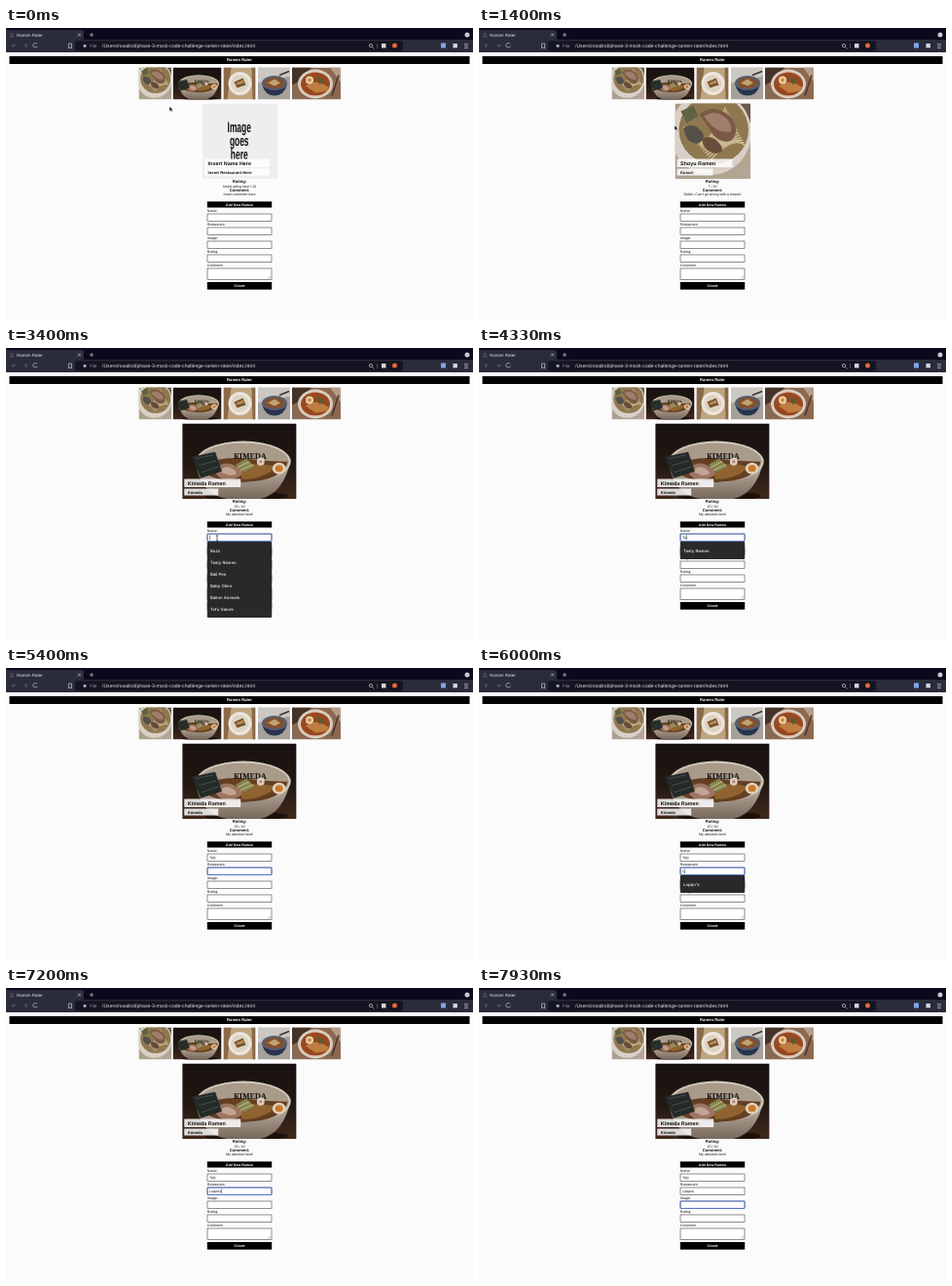
Recreate the animation shown at these times as an HTML page. Size 480 by 300 pixels, loop 8 s.

```html
<!DOCTYPE html>
<html lang="en">
<head>
<meta charset="utf-8">
<title>Ramen Rater</title>
<style>
  html, body { margin: 0; width: 100%; height: 100%; overflow: hidden; background: #fbfbfc; }
  svg#stage { display: block; width: 100vw; height: 100vh; }
  text { font: 3.6px "Liberation Sans", Arial, sans-serif; fill: #111; text-rendering: geometricPrecision; white-space: pre; }
  .bold { font-weight: bold; }
  .h2 { font-size: 5.4px; font-weight: bold; }
  .h3 { font-size: 4.2px; font-weight: bold; }
  .mid { text-anchor: middle; }
  .light { fill: #fff; }
  .poster text { font-size: 15px; font-weight: bold; }
  .menu text { font: 500 4.3px Inter, "Liberation Sans", sans-serif; fill: #f2f2f2; }
  .chrome text { fill: #e6e5ee; }
  .line { fill: none; stroke: #c9c8d6; stroke-width: .7; }
  .dim { stroke: #66657a; }
</style>
</head>
<body>
<svg id="stage" viewBox="0 0 480 300">
  <defs>
    <linearGradient id="linen" x2="1" y2="1"><stop stop-color="#a99780"/><stop offset="1" stop-color="#b3a797"/></linearGradient>
    <linearGradient id="room" x2="0" y2="1"><stop stop-color="#17110f"/><stop offset=".5" stop-color="#211712"/><stop offset="1" stop-color="#40281b"/></linearGradient>
    <linearGradient id="bowl" x2="0" y2="1"><stop stop-color="#c9beb0"/><stop offset="1" stop-color="#77685b"/></linearGradient>

    <symbol id="shoyu" viewBox="0 0 78 77" preserveAspectRatio="none">
      <rect width="78" height="77" fill="url(#linen)"/>
      <path d="M46 0H78V24Z" fill="#6d5a48"/>
      <ellipse cx="37" cy="30" rx="42" ry="43" fill="#d8d0c6"/>
      <ellipse cx="40" cy="27" rx="36" ry="35" fill="#8f784f"/>
      <g id="noodles" fill="none" stroke="#cdbb91" stroke-width="1.4"/>
      <path d="M6 8L19 2L24 13L12 20Z" fill="#5f6342"/>
      <path d="M9 25Q18 19 26 27T24 41Q11 41 9 25Z" fill="#55504a"/>
      <path d="M25 11Q38 1 51 9T63 29Q61 40 52 39T38 30T25 11Z" fill="#7b5948"/>
      <path d="M30 13Q40 6 50 13T58 29Q48 30 41 25T30 13Z" fill="#a07e6b"/>
      <path d="M28 36Q38 31 46 41T40 51Q28 47 28 36Z" fill="#6a4c3a"/>
    </symbol>

    <symbol id="house" viewBox="0 0 118 77" preserveAspectRatio="none">
      <rect width="118" height="77" fill="url(#room)"/>
      <ellipse cx="66" cy="74" rx="43" ry="5" fill="#1d120d"/>
      <path d="M14 39Q18 73 47 77H81Q105 71 112 37Z" fill="url(#bowl)"/>
      <ellipse cx="63" cy="39" rx="49" ry="21" fill="#d0c7ba"/>
      <ellipse cx="63" cy="39" rx="47" ry="19" fill="#a99b89"/>
      <path d="M17 43Q40 33 66 36T109 39Q104 59 63 60Q24 59 17 43Z" fill="#633e20"/>
      <text class="mid bold" x="70" y="36" style="font-size:8px;font-family:'Noto Serif',serif">KIMEDA</text>
      <path d="M58 46Q75 38 97 44Q85 57 62 57Z" fill="#8f6331"/>
      <path d="M33 48Q43 36 56 44T52 57Q38 60 33 48Z" fill="#9a7563"/>
      <path d="M38 49Q45 41 53 47T48 53Z" fill="#c4a391"/>
      <path d="M10 34L34 29L41 49L19 56Z" fill="#242a28"/>
      <path d="M14 36L32 32M17 43L35 38M20 50L38 44" stroke="#434c48" fill="none"/>
      <path d="M55 42L66 36L75 44L63 50Z" fill="#85834f"/>
      <path d="M57 45L69 39M60 48L73 42" stroke="#bab78b" fill="none"/>
      <circle cx="81" cy="39" r="4" fill="#d9cfc3"/><circle cx="81" cy="39" r="1.6" fill="#bd7c75"/>
      <ellipse cx="100" cy="46" rx="7" ry="6" fill="#ded0ba"/><ellipse cx="100" cy="46" rx="4" ry="3.5" fill="#c9792a"/>
    </symbol>

    <symbol id="plate" viewBox="0 0 33 33">
      <rect width="33" height="33" fill="#bda582"/>
      <path d="M0 0H8L4 33H0ZM29 0H33V33H30Z" fill="#8a6848"/>
      <circle cx="17" cy="16.5" r="12" fill="#ece6da"/>
      <circle cx="17" cy="16.5" r="9" fill="#ddd3c2"/>
      <path d="M11 15L20 11L23 18L14 21Z" fill="#76502f"/>
      <path d="M13 16L20 13L21 16L14 18Z" fill="#b58c58"/>
    </symbol>

    <symbol id="blue" viewBox="0 0 33 33">
      <rect width="33" height="33" fill="#a7a19c"/>
      <path d="M0 0H33V9L0 16Z" fill="#cbc8c4"/>
      <path d="M4 17Q7 29 17 29T30 17Z" fill="#29354b"/>
      <ellipse cx="17" cy="16" rx="13" ry="7.5" fill="#4d607d"/>
      <ellipse cx="17" cy="16" rx="11" ry="6" fill="#805331"/>
      <path d="M10 16L17 12L23 16L17 19Z" fill="#c5a071"/>
      <path d="M22 8L32 4" stroke="#3c302a" stroke-width="1.5"/>
    </symbol>

    <symbol id="spicy" viewBox="0 0 50 33">
      <rect width="50" height="33" fill="#8b6951"/>
      <path d="M0 0H20L8 14L0 18Z" fill="#463328"/>
      <path d="M39 0H50V15Z" fill="#b59c86"/>
      <ellipse cx="24" cy="17" rx="18" ry="15" fill="#d8cdc1"/>
      <ellipse cx="24" cy="17" rx="15" ry="12" fill="#98481f"/>
      <path d="M14 19Q22 12 34 18T24 26Z" fill="#bd7d3f"/>
      <circle cx="18" cy="13" r="4" fill="#e3d4b5"/><circle cx="18" cy="13" r="2" fill="#d18c2e"/>
      <path d="M26 9L33 13L28 18Z" fill="#555c35"/>
      <path d="M41 29L48 8" stroke="#4c3329" stroke-width="1.5"/>
    </symbol>
  </defs>

  <rect width="480" height="300" fill="#fbfbfc"/>

  <g class="chrome">
    <rect width="480" height="25" fill="#0b0a1c"/>
    <path d="M0 2H78Q80 2 80 4V12H480V25H0Z" fill="#2a2b3b"/>
    <rect x="71" y="13.3" width="337" height="10.4" rx="2" fill="#151421"/>
    <path class="line dim" d="M4 9L6 5L8 9ZM10 18H6m2-2l-2 2l2 2M18 18h4m-2-2l2 2l-2 2M381.5 16v5"/>
    <path class="line" d="M74 5.5l3 3m0-3l-3 3M86 7h4m-2-2v4M32 16.5a2.3 2.3 0 1 0 .3 2M64.5 16h3v5l-1.5-1.2l-1.5 1.2Z
      M376.5 19.5l2 2M471 16.5h4m-4 2h4m-4 2h4"/>
    <circle class="line" cx="375" cy="18" r="1.7"/>
    <circle cx="81" cy="18.3" r="1.6" fill="#aaa9b8"/>
    <circle cx="474" cy="7" r="2.5" fill="#c9c8d6"/>
    <rect x="386" y="16" width="4.5" height="4.5" fill="#d6d5df"/>
    <circle cx="399.5" cy="18" r="2.5" fill="#e4683c"/>
    <rect x="447" y="15.5" width="5" height="5" fill="#7fa5ec"/>
    <rect x="459.5" y="16" width="4.4" height="4.4" fill="#d6d5df"/>
    <text x="11" y="9" style="font-size:4.5px">Ramen Rater</text>
    <text x="86" y="20" style="font-size:4.6px;fill:#9694a8">File</text>
    <text x="99" y="20" style="font-size:5.1px">/Users/rosalind/phase-3-mock-code-challenge-ramen-rater/index.html</text>
  </g>

  <rect x="3.5" y="29" width="473" height="8"/>
  <text class="h3 mid light" x="240" y="34.3">Ramen Rater</text>

  <use href="#shoyu" x="136.5" y="40.5" width="33.5" height="33"/>
  <use href="#house" x="171.5" y="40.5" width="50" height="33"/>
  <use href="#plate" x="223.5" y="40.5" width="33" height="33"/>
  <use href="#blue" x="259" y="40.5" width="33" height="33"/>
  <use href="#spicy" x="294" y="40.5" width="50" height="33"/>

  <g id="blank">
    <rect x="202" y="78" width="77" height="77" fill="#eee"/>
    <g class="mid poster" transform="translate(239.7 0) scale(.56 1)">
      <text y="106.5">Image</text>
      <text y="120.5">goes</text>
      <text y="134.5">here</text>
    </g>
  </g>
  <use id="photo" y="77.5" height="77.5"/>
  <g fill="#fff" fill-opacity=".84">
    <rect id="nameBox" y="134.5" height="8.5"/>
    <rect id="placeBox" y="144.5" height="7"/>
  </g>
  <text id="dishName" class="h2" y="140.5"/>
  <text id="place" class="h3" y="149.5"/>
  <text class="h3 mid" x="240" y="159.2">Rating:</text>
  <text id="rating" class="mid" x="240" y="163.6"/>
  <text class="h3 mid" x="240" y="168.2">Comment:</text>
  <text id="comment" class="mid" x="240" y="172.4"/>

  <rect x="206.8" y="178.3" width="66.4" height="6.2"/>
  <text class="bold mid light" x="240" y="182.6">Add New Ramen</text>
  <g id="form"></g>
  <path d="M269 257.5l3-3m-1.3 3l1.3-1.3" stroke="#777" stroke-width=".4"/>
  <rect x="206.8" y="261" width="66.4" height="7.7"/>
  <text class="bold mid light" x="240" y="266.1">Create</text>

  <rect id="focus" x="207" width="66" height="7.4" rx=".8" fill="none" stroke="#4a72cc" stroke-width=".9"/>
  <text id="nameText" x="209.3" y="196.2"/>
  <text id="placeText" x="209.3" y="210.2"/>
  <rect id="caret" width=".45" height="4.6"/>
  <g id="menu" class="menu"></g>

  <path id="arrow" d="M0 0V5.2L1.3 4.1L2.2 6.1L3.1 5.7L2.2 3.7H3.8Z" stroke="#fff" stroke-width=".5"/>
  <path id="beam" d="M-1.2 -3Q0 -3 0 -2V2Q0 3 -1.2 3M1.2 -3Q0 -3 0 -2M0 2Q0 3 1.2 3" fill="none" stroke="#222" stroke-width=".7"/>
</svg>

<script>
const LOOP = 8000;
const $ = id => document.getElementById(id);
const set = (id, attrs) => { for (const key in attrs) $(id).setAttribute(key, attrs[key]); };
const show = (id, on) => set(id, { visibility: on ? "visible" : "hidden" });

// Each step is [start time, value]; the latest started step holds.
const current = (steps, t) => steps.filter(step => step[0] <= t).pop();

const dishes = [
  [0, { x: 202, width: 77, name: "Insert Name Here", place: "Insert Restaurant Here", nameWidth: 67, placeWidth: 67,
        rating: "Insert rating here / 10", comment: "Insert comment here" }],
  [530, { photo: "#shoyu", x: 201.5, width: 77.5, name: "Shoyu Ramen", place: "Kosuri", nameWidth: 57, placeWidth: 37,
          rating: "7 / 10", comment: "Delish. Can't go wrong with a classic!" }],
  [1800, { photo: "#house", x: 181.2, width: 117.4, name: "Kimeda Ramen", place: "Kimeda", nameWidth: 58, placeWidth: 35,
           rating: "10 / 10", comment: "My absolute fave!" }]
];
const fields = [["Name:", 191], ["Restaurant:", 205], ["Image:", 219], ["Rating:", 233], ["Comment:", 247]];
const focusTop = [[0, 0], [2400, 191], [4870, 205], [7420, 219]];
const typing = (word, times) => [[0, ""], ...times.map((time, i) => [time, word.slice(0, i + 1)])];
const nameTyping = typing("Taly", [3850, 4150, 4450, 4750]);
const placeTyping = typing("Loppos", [5850, 6030, 6210, 6380, 6540, 6750]);
const pastNames = ["Buzz", "Tasty Ramen", "Ball Pen", "Baby Olmo", "Ballon Animals", "Tofu Galore"];
const pastPlaces = ["Loppo's"];
const pointer = [[0, 168, 80.5], [70, 168, 80.5], [330, 149, 60], [470, 147, 58], [600, 146, 57], [930, 146, 57],
  [1330, 201, 100], [1430, 201, 100], [1700, 197, 62], [1830, 197, 62], [2180, 216, 193], [2400, 217, 195.5]];

$("form").innerHTML = fields.map(([label, y]) =>
  `<text x="206.8" y="${y - 1.7}">${label}</text>
   <rect x="207" y="${y}" width="66" height="${y === 247 ? 11.6 : 7.4}" fill="#fff" stroke="#444" stroke-width=".6"/>`).join("");

$("noodles").innerHTML = Array.from({ length: 15 }, (_, i) =>
  `<path d="M${9 + i * 2} ${24 + i * 2.4}Q${32 + i * 2} ${60 - i * 2} ${52 + i * 1.5} ${4 + i * 2.8}"/>`).join("");

function pointerAt(t) {
  const next = pointer.findIndex(key => key[0] > t);
  if (next < 0) return pointer.at(-1).slice(1);
  const [t0, x0, y0] = pointer[next - 1], [t1, x1, y1] = pointer[next];
  const p = (t - t0) / (t1 - t0), ease = p * p * (3 - 2 * p);
  return [x0 + (x1 - x0) * ease, y0 + (y1 - y0) * ease];
}

function drawDish(dish) {
  show("blank", !dish.photo);
  show("photo", dish.photo);
  set("photo", { href: dish.photo || "", x: dish.x, width: dish.width });
  const left = dish.x + 2;
  set("nameBox", { x: left, width: dish.nameWidth });
  set("placeBox", { x: left, width: dish.placeWidth });
  set("dishName", { x: left + 3.6 });
  set("place", { x: left + 3.6 });
  $("dishName").textContent = dish.name;
  $("place").textContent = dish.place;
  $("rating").textContent = dish.rating;
  $("comment").textContent = dish.comment;
}

function drawMenu(items, top) {
  $("menu").innerHTML = items.length ? `<rect x="206.8" y="${top}" width="66.4" height="${items.length * 12 + 6}" rx="1" fill="#29292b"/>` +
    items.map((item, i) => `<text x="210" y="${top + 11 + i * 12}">${item}</text>`).join("") : "";
}

function drawForm(t) {
  const [nameTime, name] = current(nameTyping, t);
  const [placeTime, place] = current(placeTyping, t);
  const [focusTime, top] = current(focusTop, t);
  $("nameText").textContent = name;
  $("placeText").textContent = place;
  show("focus", top);
  set("focus", { y: top });

  const active = top === 191 ? $("nameText") : top === 205 ? $("placeText") : null;
  const x = 209.4 + (active?.textContent ? active.getComputedTextLength() : 0);
  const idle = t - Math.max(nameTime, placeTime, focusTime);
  set("caret", { x, y: top + 1.4 });
  show("caret", top && idle % 1000 < 500);

  const matches = (list, typed) => list.filter(item => item.startsWith(typed));
  if (top === 191 && t >= 2530) drawMenu(matches(pastNames, name), 199);
  else if (top === 205 && place) drawMenu(matches(pastPlaces, place), 213);
  else drawMenu([], 0);
}

function drawPointer(t) {
  const [x, y] = pointerAt(t);
  const overField = y > 190;
  show("arrow", !overField);
  show("beam", overField && t < 3850);
  for (const id of ["arrow", "beam"]) set(id, { transform: `translate(${x} ${y})` });
}

function frame() {
  const t = performance.now() % LOOP;
  drawDish(current(dishes, t)[1]);
  drawForm(t);
  drawPointer(t);
  requestAnimationFrame(frame);
}
frame();
</script>
</body>
</html>
```
